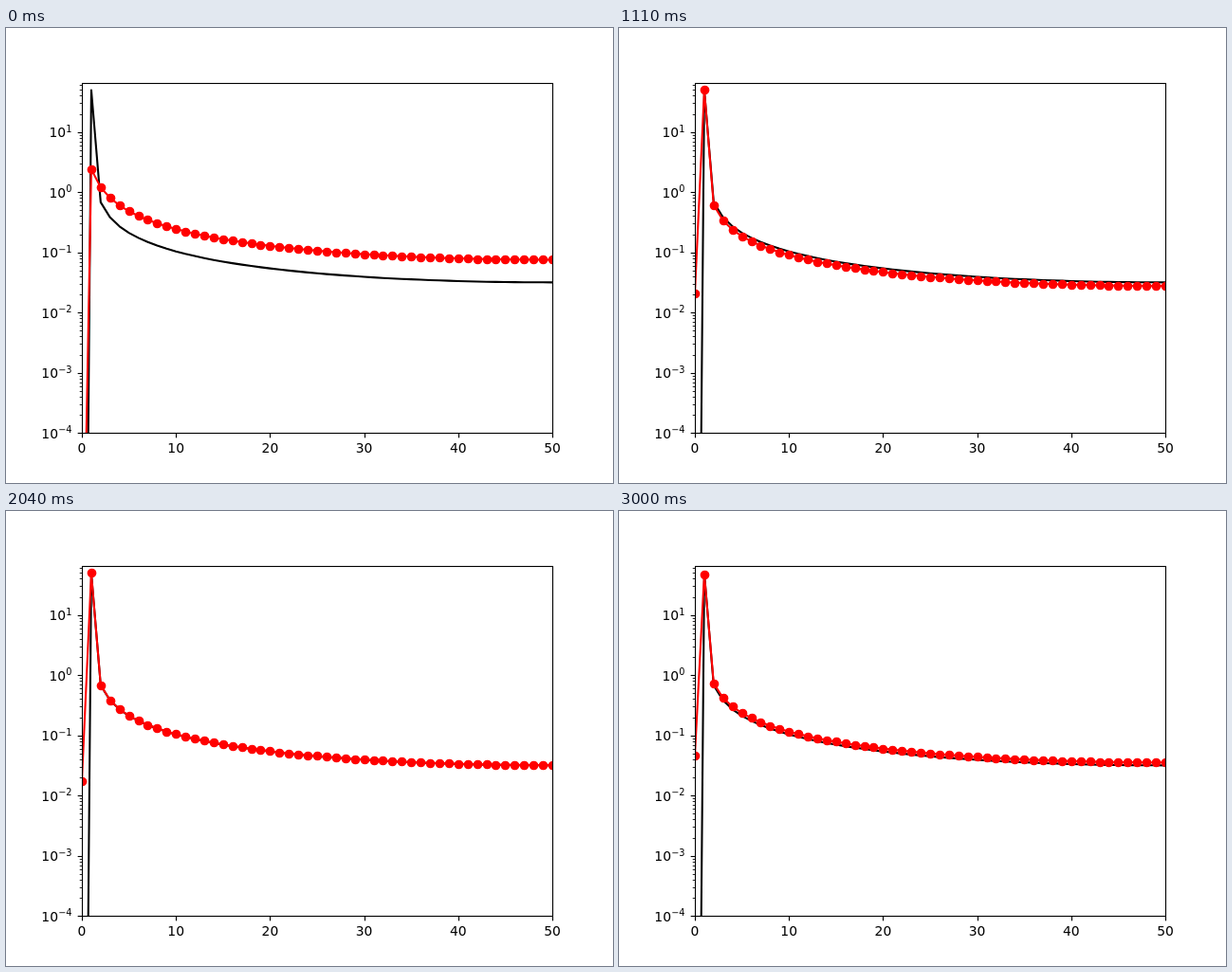
Recreate the animation shown at these times as an HTML page with a canvas. Size 640x480 px, loop 3.03 s.

```html
<!DOCTYPE html>
<html lang="en">
<head>
<meta charset="utf-8">
<title>Spectrum of a fit</title>
<style>
html, body { margin: 0; width: 100%; height: 100%; overflow: hidden; background: #fff; }
canvas { display: block; }
</style>
</head>
<body>
<canvas id="plot" width="640" height="480"></canvas>
<script>
const ctx = document.getElementById('plot').getContext('2d');
const STEP = 30, STEPS = 101, SAMPLES = 100, BINS = 51;
const LEFT = 80, RIGHT = 576, TOP = 57.6, BOTTOM = 427.2, DECADE = 63.5;
const FONT = '"DejaVu Sans", sans-serif';

// Fit parameters over time as [step, value]
const amplitude = [[0, 0], [1, .35], [3, .8], [6, 1], [8, 1.04], [16, 1], [91, 1], [100, .965]];
const jump = [[0, .151], [3, .1], [8, .03], [14, .008], [24, -.0005], [37, -.0082],
  [47, -.0082], [68, .0006], [87, -.002], [100, .0097]];
const logMean = [[0, -8], [1, -2.2], [3, -1.5], [10, -1.7], [18, -1.9], [24, -2.08], [37, -1.68],
  [47, -1.55], [52, -2.42], [58, -2], [68, -1.76], [72, -3.4], [78, -2], [87, -1.7],
  [94, -2.43], [100, -1.33]];

function sample(keys, t) {
  const i = Math.max(1, keys.findIndex(k => k[0] >= t));
  const [t0, a] = keys[i - 1], [t1, b] = keys[i];
  return a + (b - a) * (t - t0) / (t1 - t0);
}

const xOf = bin => LEFT + bin * (RIGHT - LEFT) / 50;
const yOf = log => BOTTOM - (log + 4) * DECADE;

// DFT of one sine period sampled with both end points, and of a ramp
const half = Math.PI / (SAMPLES - 1);
function sineBin(k) {
  const a = Math.PI * k / SAMPLES;
  return Math.sin(half) / 2 * (1 / Math.sin(a - half) + 1 / Math.sin(a + half));
}
const rampBin = k => 1 / (2 * Math.sin(Math.PI * k / SAMPLES));

function spectrum(amp, drop, log0) {
  return Array.from({ length: BINS }, (_, k) => [
    xOf(k),
    yOf(k ? Math.log10(Math.abs(amp * sineBin(k) + drop * rampBin(k))) : log0)
  ]);
}
const exact = spectrum(1, 0, -16);

function curve(points, color) {
  ctx.strokeStyle = color;
  ctx.lineWidth = 2.08;
  ctx.lineJoin = 'round';
  ctx.beginPath();
  points.forEach(([x, y]) => ctx.lineTo(x, y));
  ctx.stroke();
}

function dots(points) {
  ctx.fillStyle = 'red';
  for (const [x, y] of points) {
    ctx.beginPath();
    ctx.arc(Math.round(x) + .5, Math.round(y) + .5, 4.86, 0, 7);
    ctx.fill();
  }
}

function tick(x, y, dx, dy, width) {
  ctx.lineWidth = width;
  ctx.beginPath();
  ctx.moveTo(x, y);
  ctx.lineTo(x + dx, y + dy);
  ctx.stroke();
}

function text(str, x, y, size, align) {
  ctx.font = `${size}px ${FONT}`;
  ctx.textAlign = align;
  ctx.fillText(str, x, y);
}

const snap = v => Math.round(v) + .5;

function axes() {
  ctx.strokeStyle = ctx.fillStyle = '#000';
  for (let v = 0; v <= 50; v += 10) {
    tick(snap(xOf(v)), snap(BOTTOM), 0, 4.86, 1.11);
    text(v, xOf(v), 448, 13.89, 'center');
  }
  for (let e = -4; e <= 1; e++) {
    const y = yOf(e), sup = String(e).replace('-', '\u2212');
    tick(LEFT + .5, snap(y), -4.86, 0, 1.11);
    text(sup, 69.5, y + .2, 9.72, 'right');
    text('10', 69.3 - ctx.measureText(sup).width, y + 5.4, 13.89, 'right');
    for (let m = 2; m < 10; m++) {
      const minor = yOf(e + Math.log10(m));
      if (minor > TOP) tick(LEFT + .5, snap(minor), -2.78, 0, .83);
    }
  }
  ctx.lineWidth = 1.11;
  ctx.strokeRect(LEFT + .5, 58.5, RIGHT - LEFT, 369);
}

function draw(step) {
  ctx.fillStyle = '#fff';
  ctx.fillRect(0, 0, 640, 480);
  const fit = spectrum(sample(amplitude, step), sample(jump, step), sample(logMean, step));
  ctx.save();
  ctx.beginPath();
  ctx.rect(LEFT, TOP, RIGHT - LEFT, BOTTOM - TOP);
  ctx.clip();
  curve(exact, '#000');
  curve(fit, 'red');
  dots(fit);
  ctx.restore();
  axes();
}

const start = performance.now();
function loop() {
  draw(Math.floor((performance.now() - start) / STEP) % STEPS);
  requestAnimationFrame(loop);
}
loop();
</script>
</body>
</html>
```
